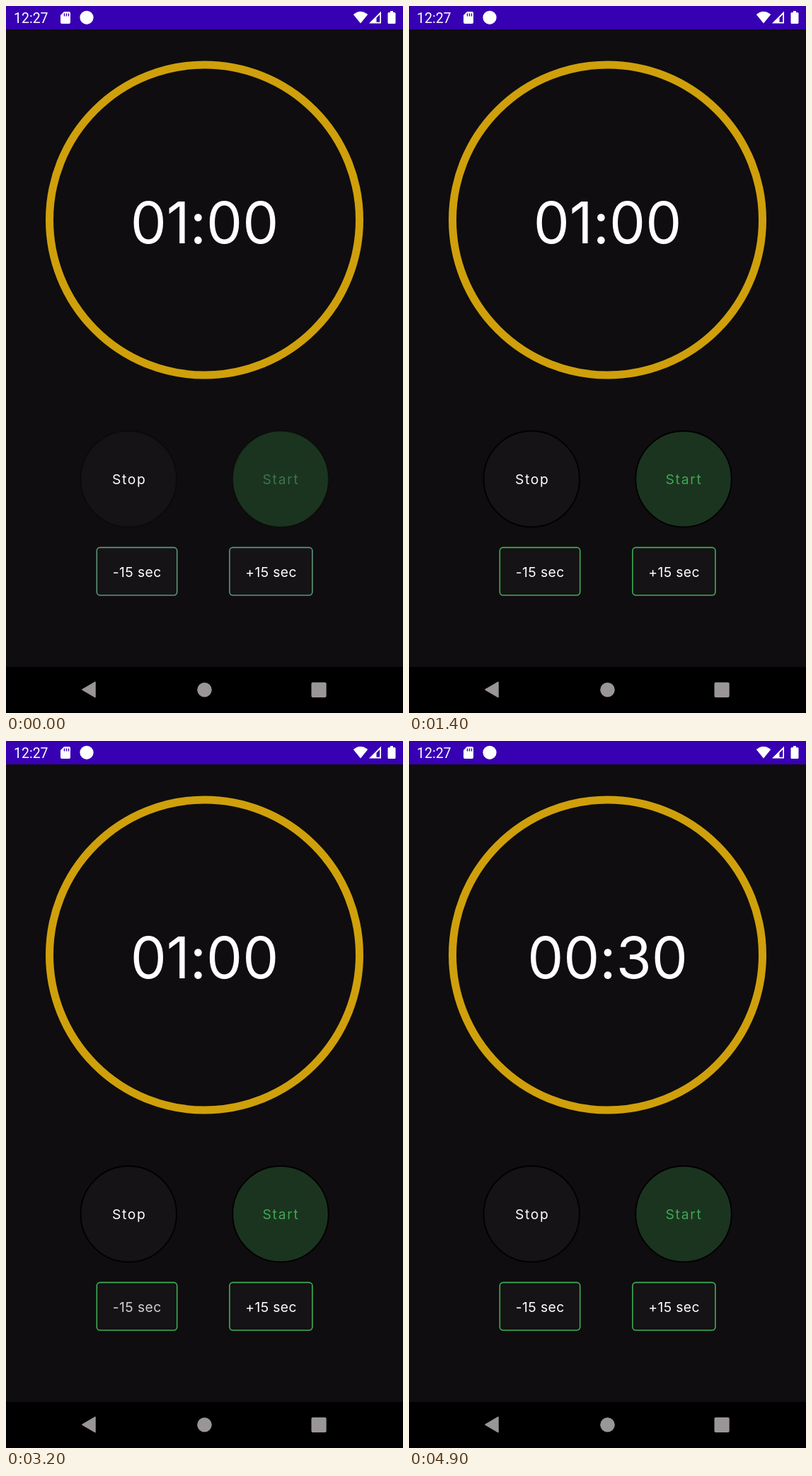
Recreate the animation shown at these times as an HTML page. Size 561 by 998 pixels, loop 5000 ms.

```html
<!DOCTYPE html>
<html lang="en">
<head>
<meta charset="utf-8">
<title>Countdown timer</title>
<style>
  html, body { margin: 0; width: 100%; height: 100%; overflow: hidden; background: #0f0d0f; }
  svg { display: block; width: 100%; height: 100%; }
  text { fill: #fff; font-family: Inter, "Open Sans", sans-serif; text-anchor: middle; }
  .clock { font: 19.5px Roboto, sans-serif; text-anchor: start; }
  .time { font-size: 81px; font-feature-settings: "calt" 0; }
  .label { font-size: 19.3px; letter-spacing: 1.7px; }
  .step { font-size: 19.3px; letter-spacing: .4px; }
  .start { fill: #3ea853; animation: label-in 5s step-end infinite; }
  .disc { stroke: #000; stroke-width: 1.8; animation: edge-in 5s step-end infinite; }
  .box { fill: #151315; stroke: #3fad55; stroke-width: 1.6; animation: box-in 5s step-end infinite; }
  @keyframes label-in { 0% { fill: #3d7449; } 2%, 100% { fill: #3ea853; } }
  @keyframes edge-in { 0% { stroke-opacity: .35; } 2%, 100% { stroke-opacity: 1; } }
  @keyframes box-in { 0% { stroke: #5d967a; } 2%, 100% { stroke: #3fad55; } }
</style>
</head>
<body>
<svg viewBox="0 0 561 998" preserveAspectRatio="none">
  <rect width="561" height="998" fill="#0f0d0f"/>
  <rect width="561" height="33" fill="#3700b3"/>
  <rect y="933" width="561" height="65"/>

  <!-- status bar -->
  <text class="clock" x="11" y="24">12:27</text>
  <g fill="#fff">
    <path d="M82 8h7q2 0 2 2v13q0 2-2 2h-10q-2 0-2-2v-10z"/>
    <circle cx="114" cy="16.3" r="9.6"/>
    <path d="M501 24.5 490.8 12Q501 3.5 511.2 12z"/>
    <path d="M530 7.5V24.5H513zM528.2 12 523.5 16.7V22.7H528.2z" fill-rule="evenodd"/>
    <path d="M543 9V7h4v2h2q1.500 0 1.500 1.500v13q0 1.500-1.500 1.500h-8q-1.500 0-1.500-1.500v-13q0-1.500 1.500-1.500z"/>
  </g>
  <path d="M82.500 10.500v4M85.500 10.500v4M88.500 10.500v4" stroke="#3700b3" stroke-width="1.400"/>

  <circle cx="280.5" cy="302" r="219" fill="none" stroke="#cfa00b" stroke-width="11"/>
  <text class="time" id="time" x="280.5" y="335">01:00</text>

  <circle class="disc" cx="173.200" cy="667.700" r="67.700" fill="#151315"/>
  <text class="label" x="174.300" y="675">Stop</text>
  <circle class="disc" cx="388" cy="667.700" r="67.700" fill="#1b341f"/>
  <text class="label start" x="388.500" y="675">Start</text>

  <rect class="box" x="128.300" y="764.400" width="113.400" height="67.400" rx="4.500"/>
  <text class="step" id="minus" x="185.200" y="806">-15 sec</text>
  <rect class="box" x="315.900" y="764.400" width="117" height="67.400" rx="4.500"/>
  <text class="step" id="plus" x="374.600" y="806">+15 sec</text>

  <!-- navigation bar -->
  <g fill="#999599">
    <path d="M108 965 126 954.500V975.500z" stroke="#999599" stroke-width="1.500" stroke-linejoin="round"/>
    <circle cx="280.500" cy="965.300" r="10.300"/>
    <rect x="431.500" y="954.800" width="21.200" height="21.200" rx="2"/>
  </g>
</svg>
<script>
  const LOOP = 5000, PRESS = 200, STEP = 15;
  const presses = {
    plus: [2100, 2400],
    minus: [2800, 3200, 3500, 3900]
  };
  const byId = id => document.getElementById(id);
  const two = n => String(n).padStart(2, "0");
  const begin = performance.now();

  function draw(now) {
    const t = Math.max(0, now - begin) % LOOP;
    const count = id => presses[id].filter(p => p <= t).length;
    const seconds = 60 + STEP * (count("plus") - count("minus"));
    byId("time").textContent = two(Math.floor(seconds / 60)) + ":" + two(seconds % 60);
    for (const id in presses) {
      const held = presses[id].some(p => t >= p && t < p + PRESS);
      byId(id).style.opacity = held ? 0.8 : 1;
    }
    requestAnimationFrame(draw);
  }
  draw(begin);
</script>
</body>
</html>
```
